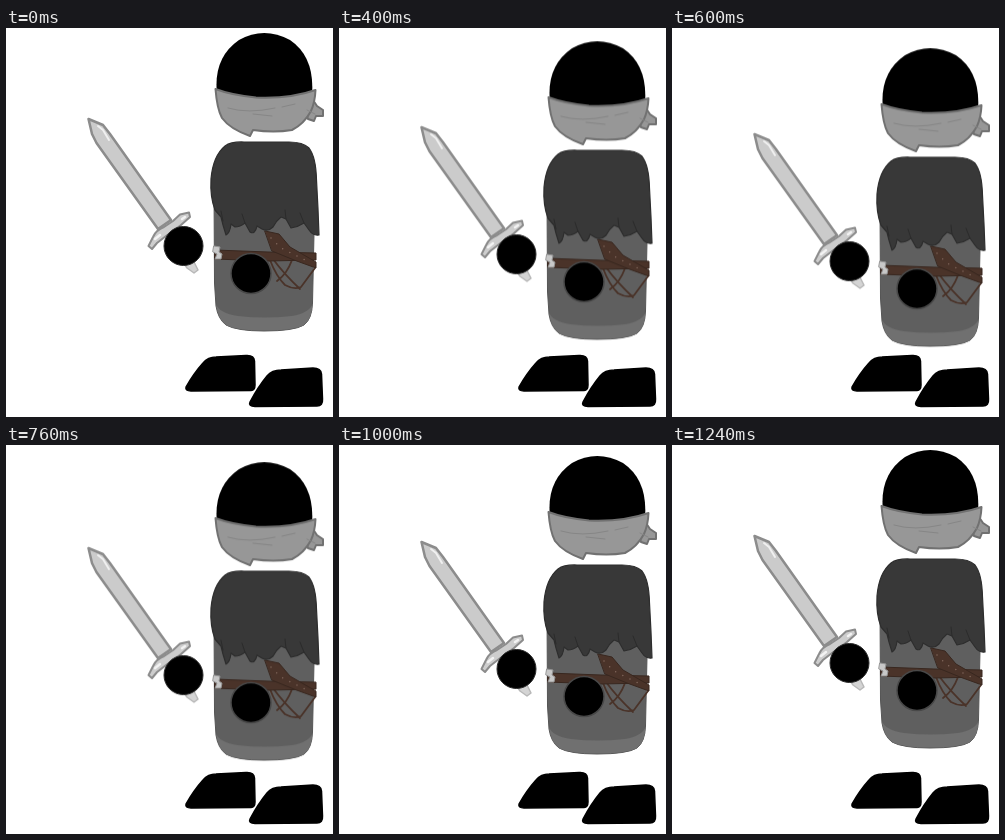
Animation, 327 px wide and 389 px high, one loop 1520 ms. Source, as an HTML page:

```html
<!DOCTYPE html>
<html lang="en">
<head>
<meta charset="utf-8">
<title>Idle swordsman</title>
<style>
  html, body { margin: 0; width: 100%; height: 100%; overflow: hidden; background: #fff; }
  svg { display: block; width: 327px; height: 389px; }
  path { stroke-linejoin: round; stroke-linecap: round; }
  .line { fill: none; }

  /* Breathing bob on a 40 ms grid, with a short rest on the way down and up */
  .bob { animation: bob 1520ms -3ms infinite; }
  @keyframes bob {
    0%        { transform: translateY(0); animation-timing-function: steps(1, end); }
    10.52632% { transform: translateY(0); animation-timing-function: steps(11, end); }
    39.47368% { transform: translateY(15.2px); animation-timing-function: steps(1, end); }
    42.10526% { transform: translateY(15.2px); animation-timing-function: steps(9, end); }
    65.78947% { transform: translateY(6px); animation-timing-function: steps(1, end); }
    68.42105% { transform: translateY(6px); animation-timing-function: steps(5, end); }
    81.57895%, 100% { transform: translateY(0); }
  }
</style>
</head>
<body>
<svg viewBox="0 0 327 389">
  <g class="feet" stroke="#000" stroke-width="1.5">
    <path d="M180 359Q188 345 197 335Q202 329 210 329L240 327.500Q248 327 248.500 333L249 357Q249 362 245 362.500L185 363Q179 363 180 359Z"/>
    <path d="M244 374Q252 359 261 348Q266 342 275 342L307 340Q315 340 315.500 346L316.500 371Q317 378 311 378L249 378.500Q242 378 244 374Z"/>
  </g>

  <g class="bob">
    <g class="body">
      <path fill="#5f5f5f" stroke="#555" d="M208 160L208.500 255L210 278Q212 291 220 297Q231 303 258 303Q288 303 298 297Q306 291 306.500 275L309 160Z"/>
      <path fill="#707070" d="M210 276Q213 285 232 288Q258 291 286 288Q303 285 306.500 276Q306 291 298 297Q288 302.500 258 302.500Q231 302.500 220 297Q212 291 210 276Z"/>
    </g>

    <g class="belt">
      <g class="line" stroke="#4a3329" stroke-width="1.8">
        <path d="M264 232Q270 248 279 257Q288 262 295 259L309 240"/>
        <path d="M267 231Q278 246 294 261"/>
        <path d="M286 232Q281 246 271 253"/>
      </g>
      <path fill="#4a3329" stroke="#38271f" d="M209 222L262 224L310 225L310 232L262 233L209 231Z"/>
      <path fill="#4a3329" stroke="#38271f" d="M259 203L273 206L284 219L310 234L310 240L288 232L266 223Z"/>
      <path class="line" stroke="#80675b" stroke-width="1.5" stroke-dasharray="0 8" d="M265 210L275 220L301 233"/>
      <path fill="#c8c8c8" stroke="#959595" d="M208 218L214 219L213 224L216 226L215 231L209 231L211 226L207 224Z"/>
    </g>

    <path class="cape" fill="#383838" stroke="#2d2d2d" stroke-width="1.2" d="M205 151Q207 128 219 118Q225 113.500 238 114L283 114Q297 114 303 120Q310 129 310.500 152L312 181L313 207Q307 208 303 202L298 195Q292 199 285 200L280 191L275 189Q270 193 267 199Q262 204 256 201L251 198Q249 207 244 204L239 195Q234 199 229 199L225 196Q224 205 220 207L217 197L215 189L209 182Q204 169 205 151Z"/>
    <path class="line" stroke="#2b2b2b" d="M217 193L215 183M239 195L236 186M280 191L279 182M298 195L294 185"/>

    <g class="head">
      <path d="M211 66Q207 30 233 12Q258-2 284 12Q309 29 306 67Q284 77 247 75Z"/>
      <g fill="#979797" stroke="#717171" stroke-width="2">
        <path d="M299 81L305 79L307 72L311 78L317 82L317 88L310 88L308 93L302 91Z"/>
        <path d="M209.500 61Q225 67 250 69.500Q284 71 309.500 62Q309 74 305 83Q298 96 286 102Q268 105 247 102L244 108Q224 101 216 90Q211 81 209.500 61Z"/>
      </g>
      <path class="line" stroke="#868686" d="M222 80Q242 86 269 80M247 86L266 88M276 79L289 76M301 82L309 86"/>
    </g>

    <g class="sword" stroke="#8c8c8c" stroke-width="2.5">
      <path fill="#d4d4d4" stroke="#b8b8b8" stroke-width="1.5" d="M179 237L188 234L192 242L188 245L181 240Z"/>
      <path fill="#cbcbcb" d="M82.500 91L97 97L104 106L165 192L152 201L90.500 115L86 106Z"/>
      <path class="line" stroke="#f0f0f0" stroke-width="2" d="M92 98L97 102L103 112"/>
      <path fill="#cdcdcd" stroke-width="2" d="M142.500 218L147 209Q150 202 158 199L167 193L174 186.500L183 184.500L184 189L175 197L160 208L151 215L146 221Z"/>
      <path class="line" stroke="#f3f3f3" stroke-width="2.5" d="M149 211L154 207M176 191L179 189"/>
    </g>

    <g class="hands" stroke="#292929" stroke-width="1">
      <circle cx="177.500" cy="218" r="19.500"/>
      <circle cx="245" cy="245.500" r="20" stroke="#484848" stroke-width="1.5"/>
    </g>
  </g>
</svg>
</body>
</html>
```
